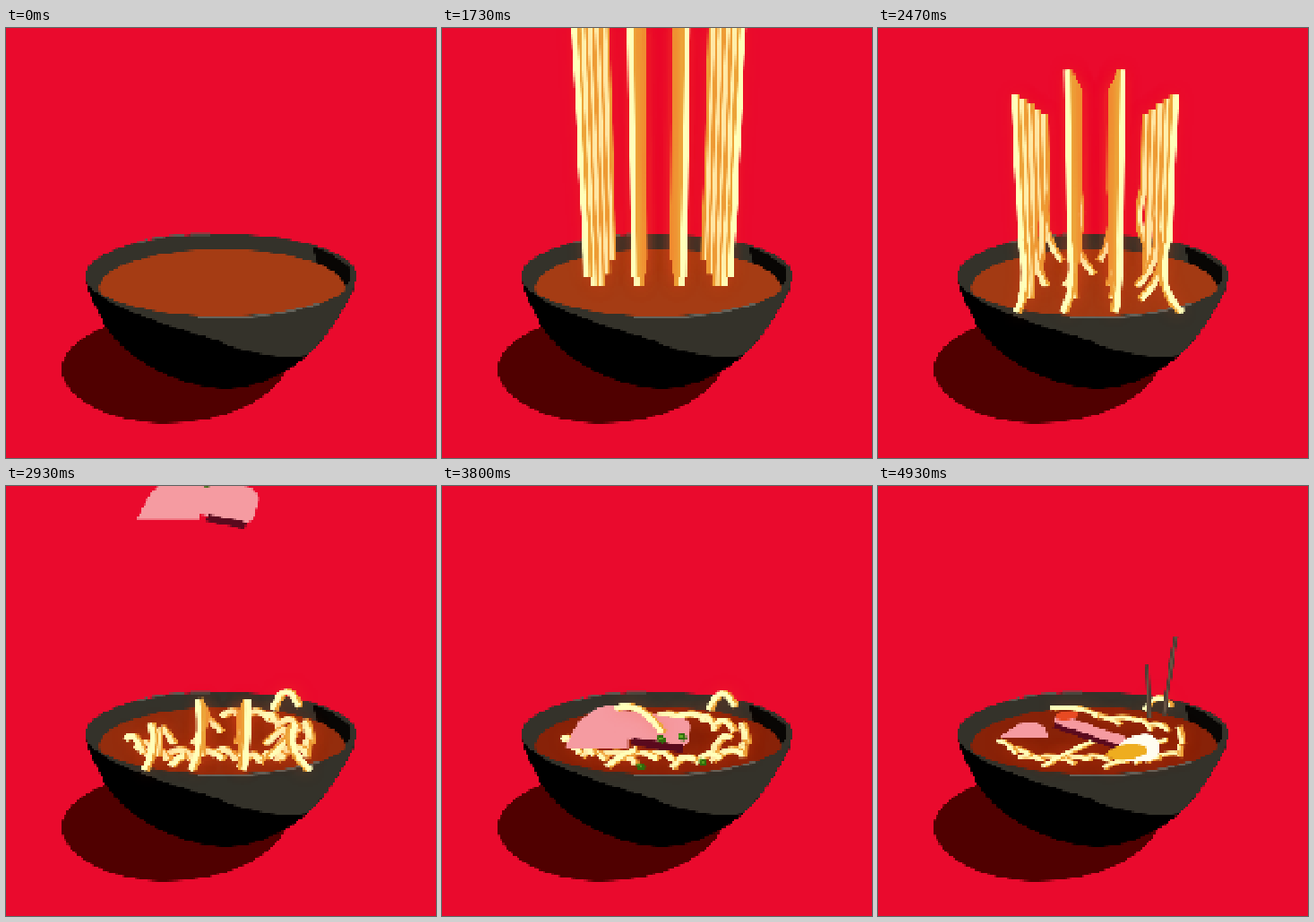
Animation of 480x480 px, one loop 4990 ms. Source, as an HTML page with a canvas:

```html
<!DOCTYPE html>
<html>
<head>
<meta charset="utf-8">
<style>
html, body { margin: 0; width: 100%; height: 100%; overflow: hidden; background: #ea0a2d; }
canvas { display: block; width: 480px; height: 480px; }
</style>
</head>
<body>
<canvas id="stage" width="480" height="480"></canvas>
<script>
const LOOP = 4990, STEP = LOOP / 75, GRID = 200, SPEED = 0.41, LOOPS = 17;
const CREAM = '#ffffba', AMBER = '#eda338', PINK = '#f59ba1', WINE = '#5a0a1e';
const canvas = (w) => Object.assign(document.createElement('canvas'), { width: w, height: w });
const stage = document.getElementById('stage').getContext('2d');
const scene = canvas(480), small = canvas(GRID);
const c = scene.getContext('2d'), s = small.getContext('2d');
stage.imageSmoothingEnabled = s.imageSmoothingEnabled = false;

const clamp = (v) => Math.min(1, Math.max(0, v));
const lerp = (a, b, k) => a + (b - a) * k;
const mix = (a, b, k) => a.map((v, i) => lerp(v, b[i], k));
const span = (t, a, b) => clamp((t - a) / (b - a));
const glide = (t, a, b) => { const k = span(t, a, b); return k * k * (3 - 2 * k); };
const drop = (t, from, to, height) => -height * (1 - span(t, from, to) ** 2);
const rand = (seed) => { const v = Math.sin(seed * 12.9898 + 4) * 43758.5453; return v - Math.floor(v); };
const settle = (t) => glide(t, 3550, 4150);
const sink = (t) => glide(t, 4200, 4900);

function fill(color, path) {
  c.fillStyle = color;
  c.fill(new Path2D(path));
}
function oval(color, x, y, rx, ry, turn = 0) {
  c.fillStyle = color;
  c.beginPath();
  c.ellipse(x, y, rx, ry, turn, 0, 7);
  c.fill();
}
function line(color, width, path) {
  c.strokeStyle = color;
  c.lineWidth = width;
  c.stroke(new Path2D(path));
}
function falling(t, from, to, height, paint) {
  if (t < from) return;
  c.save();
  c.translate(0, drop(t, from, to, height));
  paint();
  c.restore();
}
// Cream strand with an amber side and a warm glow
function noodle(path, width, shade = 2) {
  c.save();
  c.shadowColor = 'rgba(255,80,35,.35)';
  c.shadowBlur = 18;
  c.translate(shade, 0);
  line(AMBER, width, path);
  c.shadowColor = 'transparent';
  c.translate(-1.5 * shade, 0);
  line(CREAM, width - 1, path);
  c.restore();
}

function bowl(t) {
  c.fillStyle = '#ea0a2d';
  c.fillRect(0, 0, 480, 480);
  fill('#500000', 'M118 331C82 343 62 362 62 382C64 414 118 442 180 441C240 440 290 420 311 386L200 330Z');
  c.save();
  c.translate(-1, -.5);
  fill('#000', 'M89 278C91 295 103 314 110 330C130 366 185 399 245 404C285 402 318 383 336 367C362 345 376 316 388 295L393 277Z');
  fill('#34322a', 'M89 277C97 300 130 314 160 324C195 339 230 344 250 355C280 366 320 370 338 365C362 344 376 316 388 295L393 277Z');
  oval('#34322a', 241, 277, 152, 46.5);
  fill('#080604', 'M344 245Q368 252 385 269L386 280L379 290L348 265Z');
  c.save();
  c.beginPath();
  c.ellipse(241, 277, 150, 45, 0, 0, 7);
  c.clip();
  const rich = span(t, 2400, 3300);
  oval(`rgb(${mix([165, 60, 20], [136, 34, 8], rich)})`, 242, 290.5, 137, 43);
  c.restore();
  line('#5c5a52', 2, 'M148 240L160 237M165 236L178 234M183 233L199 232M208 231L228 231');
  line('#65635b', 2, 'M215 323L271 323L295 320L320 316L352 308');
  c.restore();
}

// Four columns of five strands in perspective, back row first
function pour(t) {
  const slack = glide(t, 1730, 2470);
  for (let row = 4; row >= 0; row--) for (let col = -1.5; col < 2; col++) {
    const depth = row / 4;
    const soupY = lerp(317, 260, depth);
    const top = Math.max(-5, 46 + 14 * col * col + 22 * depth + (t - 2470) * SPEED);
    const end = Math.min(soupY, lerp(8, 50, depth) + (t - 1070) * SPEED);
    if (end < 0 || top > soupY - 3) continue;
    const at = (y) => 242 + col * lerp(lerp(62, 40, depth), lerp(52, 35, depth), y / soupY);
    const curl = (rand(row * 4 + col) - .5) * 44 * slack;
    const bend = Math.max(top, end - 80);
    noodle(`M${at(top)} ${top}L${at(bend)} ${bend}Q${at(end) - curl * .6} ${end - 28} ${at(end) + curl} ${end}`,
      lerp(7.5, 6, depth), col > 0 ? -2 : 2);
  }
}

const thickness = (t) => 7.5 - settle(t) - sink(t);
function arc(t, x, y, x2, y2, rise) {
  c.setLineDash([span(t, 2550, 3300) * 110, 300]);
  noodle(`M${x} ${y}Q${(x + x2) / 2} ${(y + y2) / 2 - rise} ${x2} ${y2}`, thickness(t));
  c.setLineDash([]);
}

// Loops scattered along the rim from the back, round the right, to the front left
function pile(t) {
  if (t < 2550) return;
  const calm = settle(t);
  for (let i = 0; i < LOOPS; i++) {
    const angle = lerp(-.45, .92, i / (LOOPS - 1)) * Math.PI + calm * .15 * (rand(i + 60) - .5);
    const reach = .55 + .3 * rand(i);
    const x = 242 + 125 * reach * Math.cos(angle), y = 284 + 33 * reach * Math.sin(angle);
    const lean = angle + Math.PI / 2 + rand(i + 20) - .5;
    const half = lerp(14, 24, rand(i + 40));
    const dx = half * Math.cos(lean), dy = half * .4 * Math.sin(lean);
    arc(t, x - dx, y - dy, x + dx, y + dy, lerp(20, 6, calm));
  }
  arc(t, 298, 250, 327, 247, lerp(38, 24, calm));
  arc(t, 184, 313, lerp(200, 248, calm), lerp(300, 282, calm), 4);
}

function meat(t) {
  const calm = settle(t), low = sink(t);
  c.save();
  c.beginPath();
  c.rect(0, -100, 480, lerp(398, 391, calm) - 10 * low);
  c.clip();
  c.translate(26 * (1 - calm), 18 * low);
  fill(PINK, 'M121 290L136 262L156 248L172 245L187 251L191 266L191 293L121 293Z');
  c.restore();
  // x, y, turn, face height, side height
  const [x, y, turn, face, side] = mix(mix([238, 274, .2, 38, 8], [229, 273, .06, 13, 10], calm), [236, 275, .33, 11, 6], low);
  c.save();
  c.translate(x, y);
  c.rotate(turn);
  c.fillStyle = PINK;
  c.beginPath();
  c.roundRect(-42, -(face + side) / 2, 84, face + 2, face / 3);
  c.fill();
  c.fillStyle = WINE;
  c.fillRect(lerp(-10, -40, calm), (face - side) / 2, lerp(44, 80, calm), side);
  c.restore();
}

function scallions(t) {
  const size = 1 - settle(t);
  for (let i = 0; i < 4; i++) falling(t, 2850 + i * 50, 3250 + i * 50, 330, () => {
    const x = 222 + i * 23, y = 313 - 36 * Math.sin(i);
    oval('#2f6d0c', x, y, 8 * size, 6 * size, .5);
    oval('#65ad24', x - 1, y - 1, 4 * size, 2 * size, .5);
  });
}

function egg(t) {
  const low = sink(t);
  oval('#fffdf0', 285 + 6 * low, 293, 33 - 9 * low, 15, -.15);
  oval('#fffdf0', 298, 292, 17, 15);
  oval('#eead1f', 278, 298 - low, 23, 10 - 2 * low, -.1);
}

function chopsticks(t) {
  const k = glide(t, 4200, 4700);
  const [x, y, x2, x3, y3] = mix([316, 180, 312, 329, 163], [300, 200, 303, 332, 168], k);
  const path = `M${x} ${y}L${x2} 259M${x3} ${y3}L319 256`;
  line('#4c3d33', 5, path);
  line('#685444', 2, path);
}

function draw(now) {
  const t = Math.floor((now % LOOP + 5) / STEP) * STEP % LOOP;
  bowl(t);
  pile(t);
  pour(t);
  falling(t, 2730, 3200, 310, () => meat(t));
  if (t > 3200) arc(t, 194, 248, 246, lerp(286, 256, settle(t)), lerp(32, 8, settle(t)));
  if (t > 4400) oval('#e84a22', 211, 256 + 8 * (1 - span(t, 4400, 4800)), 13, 5, -.15);
  scallions(t);
  falling(t, 3750, 4080, 320, () => egg(t));
  falling(t, 3850, 4160, 270, () => chopsticks(t));
  // Coarse pixel grid
  s.drawImage(scene, 0, 0, GRID, GRID);
  stage.drawImage(small, 0, 0, 480, 480);
}

let start;
function tick(now) {
  start ??= now;
  draw(now - start);
  requestAnimationFrame(tick);
}
requestAnimationFrame(tick);
</script>
</body>
</html>
```
